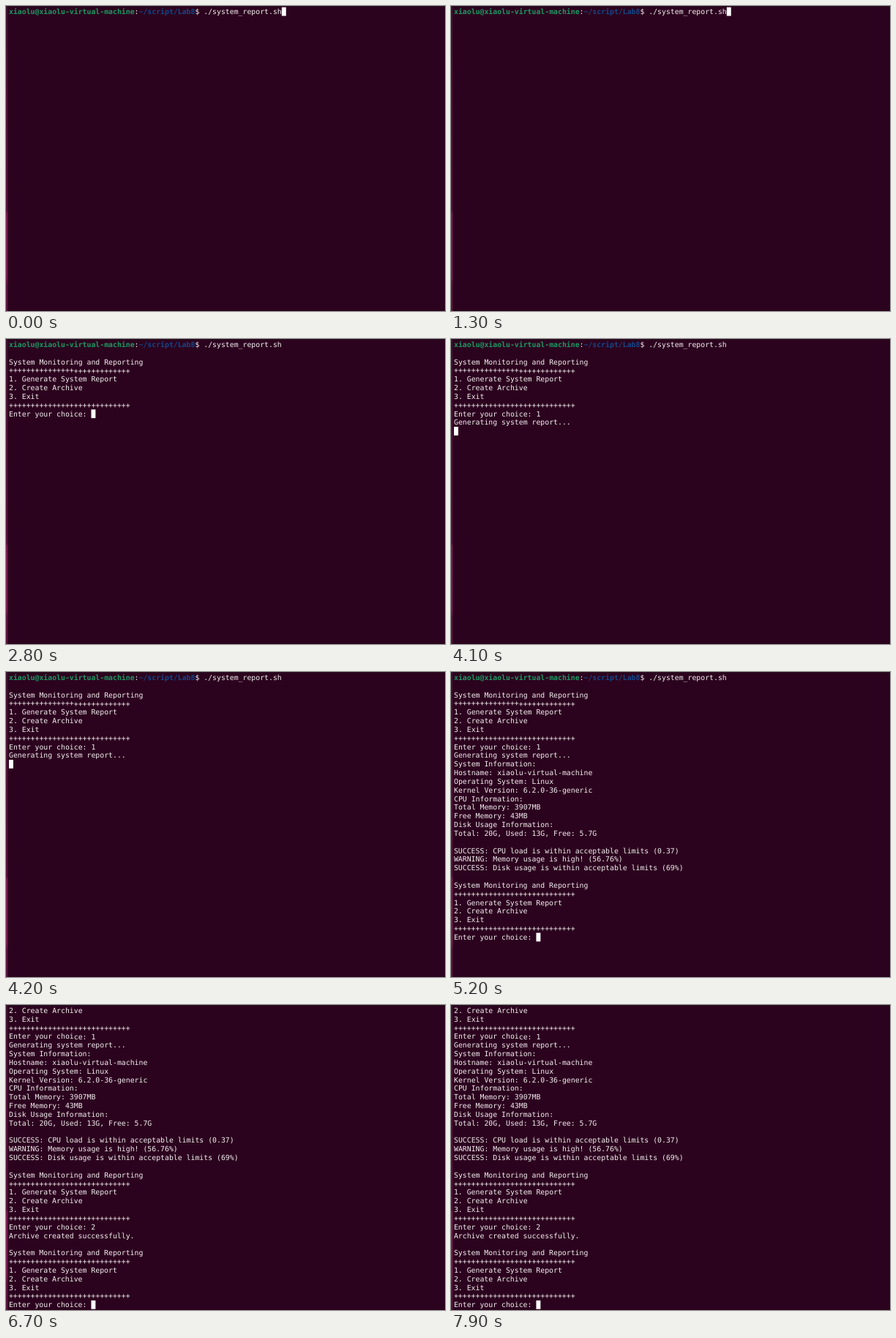
An HTML page that plays this animation: 600x417 px, repeating every 8 s.

```html
<!DOCTYPE html>
<html lang="en">
<head>
<meta charset="utf-8">
<title>Terminal</title>
<style>
  html, body { margin: 0; width: 100%; height: 100%; overflow: hidden; background: #2c031e; }
  svg { display: block; width: 600px; height: 417px; }
  text {
    font: 9.83px "DejaVu Sans Mono", monospace;
    fill: #f3eff1;
    white-space: pre;
    text-rendering: geometricPrecision;
  }
  .host, .path { font-weight: bold; }
  .host { fill: #1c9a63; }
  .path { fill: #14478a; }
</style>
</head>
<body>
<svg viewBox="0 0 600 417">
  <defs>
    <linearGradient id="edge" x1="0" y1="0" x2="0" y2="1">
      <stop offset="0" stop-color="#3a112c"/>
      <stop offset=".3" stop-color="#511037"/>
      <stop offset=".67" stop-color="#57113b"/>
      <stop offset=".68" stop-color="#7a1b4f"/>
      <stop offset=".89" stop-color="#7a1b4f"/>
      <stop offset=".91" stop-color="#5e153f"/>
      <stop offset="1" stop-color="#57143b"/>
    </linearGradient>
  </defs>
  <rect width="600" height="417" fill="#2c031e"/>
  <rect width="600" height="1" fill="#26101f"/>
  <rect width="2.4" height="417" fill="url(#edge)"/>
  <!-- The tiny turn keeps baselines from snapping to whole pixels. -->
  <g id="screen" transform="rotate(.01)"></g>
  <rect id="cursor" width="5.92" height="11.83" fill="#fff"/>
</svg>
<script>
const LOOP = 8000, BLINK = 600, ROWS = 35;
const LEFT = 4, BASE = 11, CELL_W = 5.918, CELL_H = 11.83;

const user = 'xiaolu', machine = user + '-virtual-machine';
const host = `${user}@${machine}`, path = '~/script/Lab8';
const rule = '+'.repeat(28);
const menu = `
System Monitoring and Reporting
${rule}
1. Generate System Report
2. Create Archive
3. Exit
${rule}
Enter your choice: `;
const report = `System Information:
Hostname: ${machine}
Operating System: Linux
Kernel Version: 6.2.0-36-generic
CPU Information:
Total Memory: 3907MB
Free Memory: 43MB
Disk Usage Information:
Total: 20G, Used: 13G, Free: 5.7G

SUCCESS: CPU load is within acceptable limits (0.37)
WARNING: Memory usage is high! (56.76%)
SUCCESS: Disk usage is within acceptable limits (69%)
`;

// Each key press restarts the cursor blink.
const steps = [
  { at: -300, key: true, out: `${host}:${path}$ ./system_report.sh` },
  { at: 1600, key: true, out: '\n' + menu },
  { at: 3300, key: true, out: '1' },
  { at: 4000, key: true, out: '\nGenerating system report...\n' },
  { at: 4500, out: report + menu },
  { at: 6000, key: true, out: '2' },
  { at: 6700, key: true, out: '\nArchive created successfully.\n' + menu }
];

const screen = document.getElementById('screen');
const cursor = document.getElementById('cursor');
const span = (cls, s) => `<tspan class="${cls}">${s}</tspan>`;
const paint = line => line.startsWith(host)
  ? line.replace(host, span('host', host)).replace(path, span('path', path))
  : line;

function show(done) {
  const lines = done.map(s => s.out).join('').split('\n').slice(-ROWS);
  const last = lines.length - 1;
  screen.innerHTML = lines.map((line, i) =>
    `<text x="${LEFT}" y="${BASE + i * CELL_H}">${paint(line)}</text>`).join('');
  cursor.setAttribute('x', LEFT + lines[last].length * CELL_W);
  cursor.setAttribute('y', 1.7 + last * CELL_H);
}

let shown = 0;
function frame(now) {
  const t = now % LOOP;
  const done = steps.filter(s => s.at <= t);
  if (done.length !== shown) {
    shown = done.length;
    show(done);
  }
  const lastKey = done.filter(s => s.key).pop().at;
  const on = (t - lastKey) % (2 * BLINK) < BLINK;
  cursor.setAttribute('visibility', on ? 'visible' : 'hidden');
  requestAnimationFrame(() => frame(performance.now() - start));
}
const start = performance.now();
frame(0);
</script>
</body>
</html>
```
